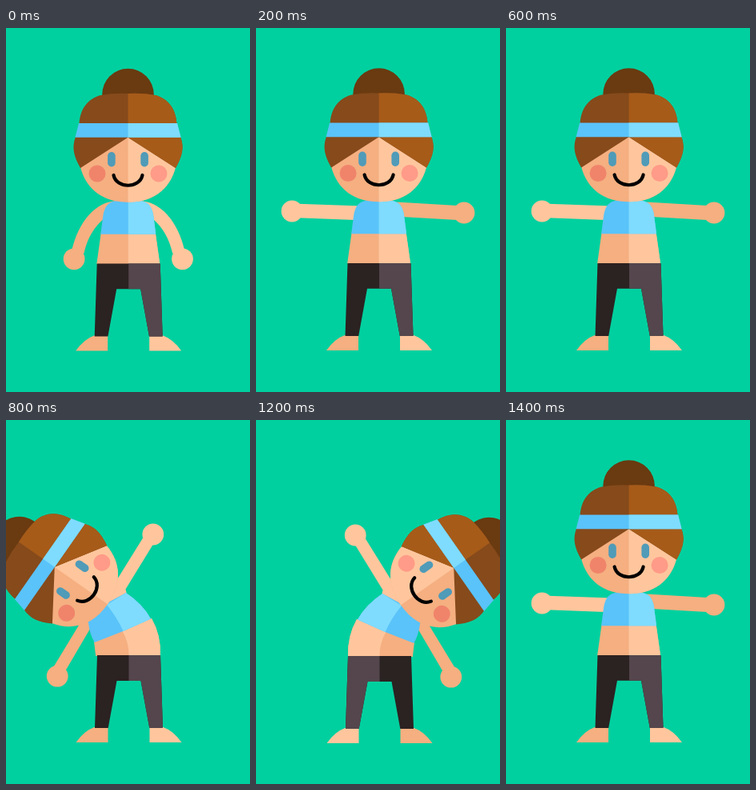
An HTML page that plays this animation: 305x455 px, repeating every 1.6 s.

```html
<!DOCTYPE html>
<html lang="en">
<head>
<meta charset="utf-8">
<title>Side bends</title>
<style>
  html, body { margin: 0; width: 100%; height: 100%; overflow: hidden; background: #00d09f; }
  svg { display: block; width: 100vw; height: 100vh; }
  .pose { visibility: hidden; }
  .pose.on { visibility: visible; }
  .skin { fill: #ffc69d; }
  .shade { fill: #f5af80; }
  .top { fill: #7fdcff; }
  .topShade { fill: #5ac3f9; }
  .hair { fill: #a65b19; }
  .hairShade { fill: #864a1b; }
  .pants { fill: #54464c; }
  .pantsShade { fill: #2b2222; }
</style>
</head>
<body>
<svg id="stage" viewBox="0 0 305 455"></svg>
<script>
const stage = document.getElementById('stage');
const STEP = 200;
const ORDER = ['rest', 'out', 'right', 'out', 'left', 'out', 'right', 'out'];

const path = (cls, d) => `<path class="${cls}" d="${d}"/>`;
const circle = (cls, x, y, r = 13.4) => `<circle class="${cls}" cx="${x}" cy="${y}" r="${r}"/>`;
const group = (transform, inner) => `<g transform="${transform}">${inner}</g>`;

// Symmetric shape around x = 0: shaded whole, lit right half on top
const split = (dark, light, d) =>
  path(dark, d) + `<g clip-path="url(#half)">${path(light, d)}</g>`;

const head = [
  '<circle cy="83" r="32.3" fill="#6a3a10"/>',
  split('shade', 'skin', 'M-59.5 174 C-52 203 -30 217.8 0 217.8 C30 217.8 52 203 59.5 174 L40 137 H-40 Z'),
  split('hairShade', 'hair', 'M-65.5 136 C-70.5 149 -68 160 -59.5 175 L0 136.8 L59.5 175 C68 160 70.5 149 65.5 136 Z'),
  split('hairShade', 'hair', 'M-61 120 C-60 101 -50 88 -34 84 Q-18 81 0 82 Q18 81 34 84 C50 88 60 101 61 120 Z'),
  split('topShade', 'top', 'M-61.5 119 H61.5 L66 136.8 H-66 Z'),
  '<g fill="#4f9bb8"><rect x="-25.4" y="155" width="9.6" height="18.5" rx="4.8"/>',
  '<rect x="15.8" y="155" width="9.6" height="18.5" rx="4.8"/></g>',
  '<circle cx="-38.5" cy="182" r="10.5" fill="#f0846b"/>',
  '<circle cx="38.5" cy="182" r="10.5" fill="#ff9b88"/>',
  '<path d="M-18 184 C-14.5 201 14.5 201 18 184" fill="none" stroke="#000" stroke-width="4.2" stroke-linecap="round"/>'
].join('');

const torso =
  split('shade', 'skin', 'M-34 256 H34 L39.5 295 H-39.5 Z') +
  split('topShade', 'top', 'M-34.5 257.8 L-31.5 235 Q-29 216.5 -14 216 H14 Q29 216.5 31.5 235 L34.5 257.8 Z');

const legs =
  path('shade', 'M-66 403.5 H-26 V384 H-42 Q-56 389 -66 403.5 Z') +
  path('skin', 'M66 403.5 H26 V384 H42 Q56 389 66 403.5 Z') +
  split('pantsShade', 'pants', 'M-39.5 294.5 H39.5 L42.5 385.5 H25.8 L15 326.3 H-15 L-25.8 385.5 H-42.5 Z');

const restArm = cls =>
  path(cls, 'M-14 216 C-40 217 -62 240 -71 280 L-55.5 282 C-51 263 -44 250 -30 238 Z') +
  circle(cls, -67.7, 288.8);

const outArms =
  path('skin', 'M45 219.5 L132 222.5 L124 240 L45 237 Z') + circle('skin', 45, 229) +
  path('shade', 'M176 217.5 L260 222.5 V240.5 L182 236 Z') + circle('shade', 260, 231);

const lean = [
  path('skin', 'M122 153 L136 147 L172 205 L184 232 L157 219 L158.5 212.5 Z'), circle('skin', 124.2, 144),
  path('shade', 'M196 250 L213 251 L250 312 L234 315 L200 257 Z'), circle('shade', 243.8, 321.2),
  path('shade', 'M126 249 L198 278 L195.8 296 H115 Q114 270 126 249 Z'),
  path('skin', 'M126 249 L163 264 Q154 279 154.5 296 H115 Q114 270 126 249 Z'),
  path('topShade', 'M158 217 L182 230 L205.3 253 Q203.3 269 197.3 279 L161.5 265 L127 249.5 Q137 231 158 217 Z'),
  path('top', 'M158 217 L182 232 Q169 248 161.5 265 L127 249.5 Q137 231 158 217 Z'),
  group('translate(154.5 .6) scale(-1 1)', legs),
  group('translate(210.2 210.8) rotate(55) scale(-1 1) translate(0 -182)', head)
].join('');

const poses = {
  rest: group('translate(152.8 0)', restArm('shade') + group('scale(-1 1)', restArm('skin')) + torso) +
    group('translate(153.2 0)', legs) + group('translate(152.5 0)', head),
  out: outArms + group('translate(153.6 -.5)', torso + head) + group('translate(154 -.5)', legs),
  right: lean,
  left: group('translate(308 -1) scale(-1 1)', lean)
};

stage.innerHTML =
  '<defs><clipPath id="half"><rect width="200" height="455"/></clipPath></defs>' +
  '<rect width="305" height="455" fill="#00d09f"/>' +
  Object.entries(poses).map(([name, art]) => `<g class="pose" id="${name}">${art}</g>`).join('');

const layers = [...stage.querySelectorAll('.pose')];
const start = performance.now();

function draw(now) {
  const t = Math.max(0, now - start);
  const current = ORDER[Math.floor(t / STEP) % ORDER.length];
  layers.forEach(el => el.classList.toggle('on', el.id === current));
  requestAnimationFrame(draw);
}
draw(start);
</script>
</body>
</html>
```
